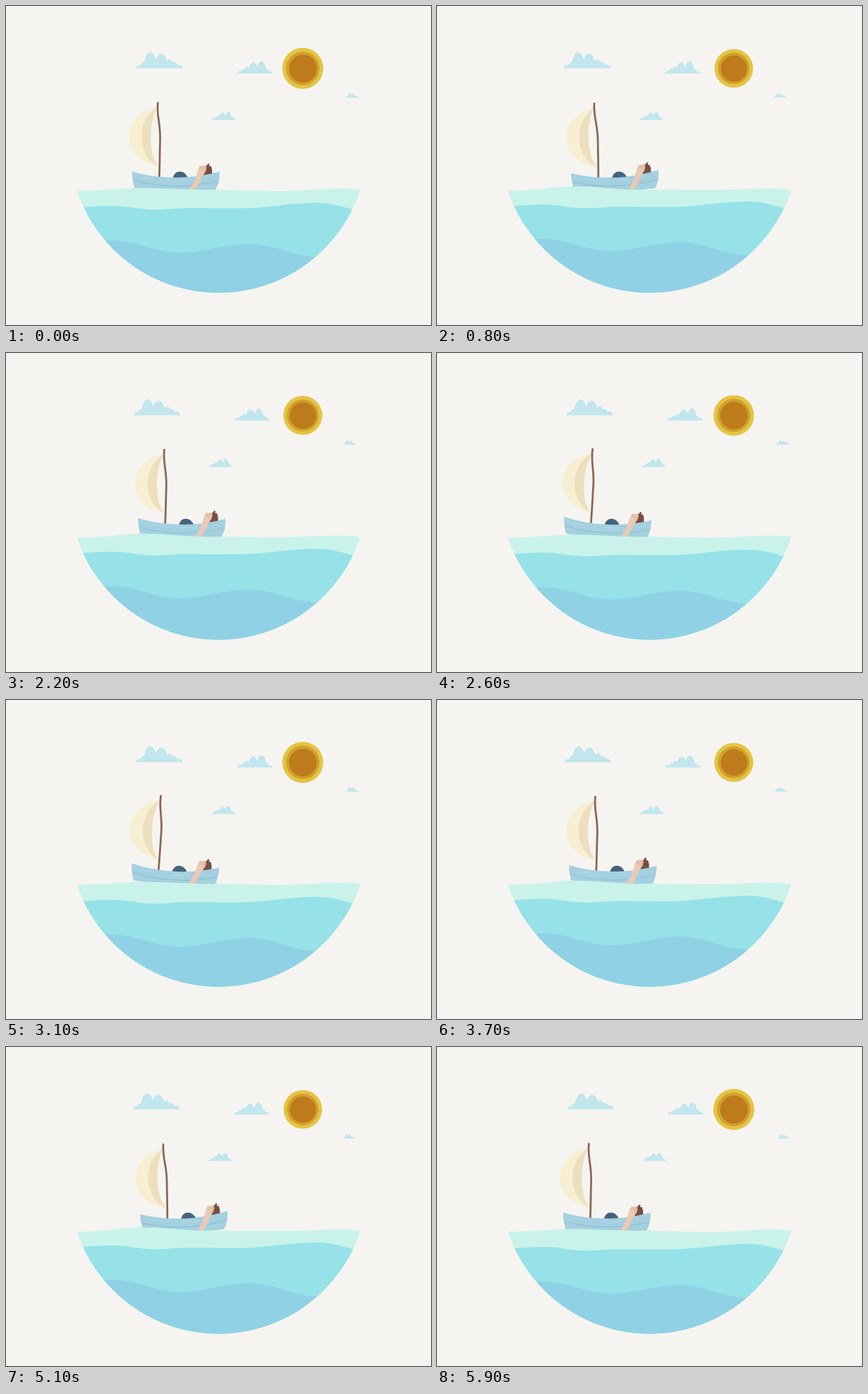
Animation of 600 by 450 pixels, one loop 6 s. Source, as an HTML page with a canvas:

```html
<!DOCTYPE html>
<html lang="en">
<head>
<meta charset="utf-8">
<title>Sailing boat</title>
<style>
html, body { margin: 0; width: 100%; height: 100%; overflow: hidden; background: #f5f4f0; }
canvas { display: block; }
</style>
</head>
<body>
<canvas id="stage" width="600" height="450"></canvas>
<script>
const ctx = document.getElementById('stage').getContext('2d');
const LOOP = 6000, STEP = 100, TAU = Math.PI * 2;

const ease = k => (1 - Math.cos(Math.PI * k)) / 2;

function disc(x, y, r, color) {
  ctx.fillStyle = color;
  ctx.beginPath();
  ctx.arc(x, y, r, 0, TAU);
  ctx.fill();
}

function fillPath(d, color) {
  ctx.fillStyle = color;
  ctx.fill(new Path2D(d));
}

function strokePath(d, color, width) {
  ctx.strokeStyle = color;
  ctx.lineWidth = width;
  ctx.stroke(new Path2D(d));
}

function drawSun(swing) {
  const r = 27.5 + 1.45 * swing;
  disc(419, 88, r, '#e4c443');
  disc(419, 88, r * 0.82, '#d2a02c');
  disc(419.3, 88.3, r * 0.68, '#bd7b1c');
}

// One cloud made of half ellipses on a flat base; the others are scaled or mirrored copies.
const puffs = [[5, 5, 4.5], [11, 5.5, 8.5], [20, 9.3, 22.5], [35.5, 9.5, 20.5], [47, 6, 12.5], [53, 6, 9], [60, 6, 5]];

function drawCloud(x, base, scale, flip = 1) {
  ctx.save();
  ctx.translate(x, base);
  ctx.scale(scale * flip, scale);
  ctx.fillStyle = '#c1e6ee';
  ctx.beginPath();
  for (const [cx, rx, ry] of puffs) {
    ctx.moveTo(cx - rx, 0);
    ctx.ellipse(cx, 0, rx, ry, 0, Math.PI, TAU);
  }
  ctx.fill();
  ctx.restore();
}

function drawClouds(swing) {
  const drift = -3.7 * (1 - swing);
  drawCloud(183.7 + drift, 87.7, 1);
  drawCloud(376 + drift, 95.3, 0.757, -1);
  drawCloud(324 + drift, 160.7, 0.51, -1);
  drawCloud(480 + drift, 129.2, 0.275);
}

function drawSail() {
  fillPath('M213.5 143C160 152 160 218 215 226C201 211 201 165 213.5 143Z', '#f8efd2');
  fillPath('M213.5 143C183.5 160 183.5 211 215 226C201 211 201 165 213.5 143Z', '#ebdfbe');
  strokePath('M214.5 135.5C212 156 218.5 165 217.5 190C217 210 217 225 216.3 242', '#8a6552', 2.7);
}

function drawSailor() {
  fillPath('M235.5 243C238 230.5 252 230.5 257 243Z', '#46637c');
  fillPath('M279 226L283 225.5Q284 222.5 287 222L287 226L289.5 226Q291.5 231 291 237L279 239Z', '#774f42');
  fillPath('M271 232Q272 226 276 225L278 226L281 224.5Q284 226.5 282.5 231Q281.5 237 276 238Q271.5 237 271 232Z', '#e4bfa9');
}

function drawHull() {
  fillPath('M178 233.5Q205 242 242 242Q273 241.5 301.5 233.5Q302 248 296 259Q240 264 182 257.5Q178 247 178 233.5Z', '#a4d0e0');
  strokePath('M179.5 246Q239 262 300 246.5', '#8bbccf', 1);
  strokePath('M191 241Q200 244 210 244.5M236 246.5Q250 247 262 245.5', '#b9dde8', 0.8);
}

function drawArm() {
  fillPath('M271 232Q272 228 277 231Q280 235 277.5 239Q273 252 264 263L256 263Q266 250 271 232Z', '#eacab5');
}

function drawBoat(swing, theta) {
  const tilt = -0.7 - 1.5 * Math.cos(theta) + 2.2 * Math.cos(2 * theta);
  ctx.save();
  ctx.translate(240 + 8.6 * (1 - swing), 212);
  ctx.rotate(tilt * TAU / 360);
  ctx.translate(-240, -212);
  drawSail();
  drawSailor();
  drawHull();
  drawArm();
  ctx.restore();
}

// Crests and troughs as x, y and an optional own rise; the surface is eased between them.
const waves = [
  { color: '#c9f3ea', rise: 0, turns: [[80, 260], [110, 260.3], [195, 256.8, -4], [285, 259.2], [388, 261, -2.5], [475, 257.5], [530, 261, 4]] },
  { color: '#96e2e8', rise: -3.3, turns: [[80, 285], [150, 282], [210, 287.3], [255, 285.2], [325, 285.6], [440, 277.8], [530, 294]] },
  { color: '#90d1e5', rise: -4, turns: [[80, 331], [150, 331], [245, 348], [343, 335.7], [440, 354], [530, 354]] }
];

function drawWave({ color, rise, turns }, mix) {
  const points = turns.map(([x, y, own = rise]) => [x, y + own * mix]);
  ctx.fillStyle = color;
  ctx.beginPath();
  ctx.moveTo(80, 420);
  for (let i = 1; i < points.length; i++) {
    const [x0, y0] = points[i - 1], [x1, y1] = points[i];
    for (let x = x0; x <= x1; x += 2) {
      ctx.lineTo(x, y0 + (y1 - y0) * ease((x - x0) / (x1 - x0)));
    }
  }
  ctx.lineTo(530, 420);
  ctx.fill();
}

function drawSea(swing) {
  ctx.save();
  ctx.beginPath();
  ctx.arc(300, 193.8, 210.7, 0, TAU);
  ctx.clip();
  waves.forEach(wave => drawWave(wave, (1 - swing) / 2));
  ctx.restore();
}

function render(now) {
  // Each pose is held for one step and shows the middle of it.
  const time = (Math.floor(now / STEP) + 0.5) * STEP % LOOP;
  const theta = time / LOOP * TAU;
  const swing = Math.cos(2 * theta);
  ctx.fillStyle = '#f5f4f0';
  ctx.fillRect(0, 0, 600, 450);
  drawSun(swing);
  drawClouds(swing);
  drawBoat(swing, theta);
  drawSea(swing);
}

const start = performance.now();
function tick() {
  render(performance.now() - start);
  requestAnimationFrame(tick);
}
tick();
</script>
</body>
</html>
```
